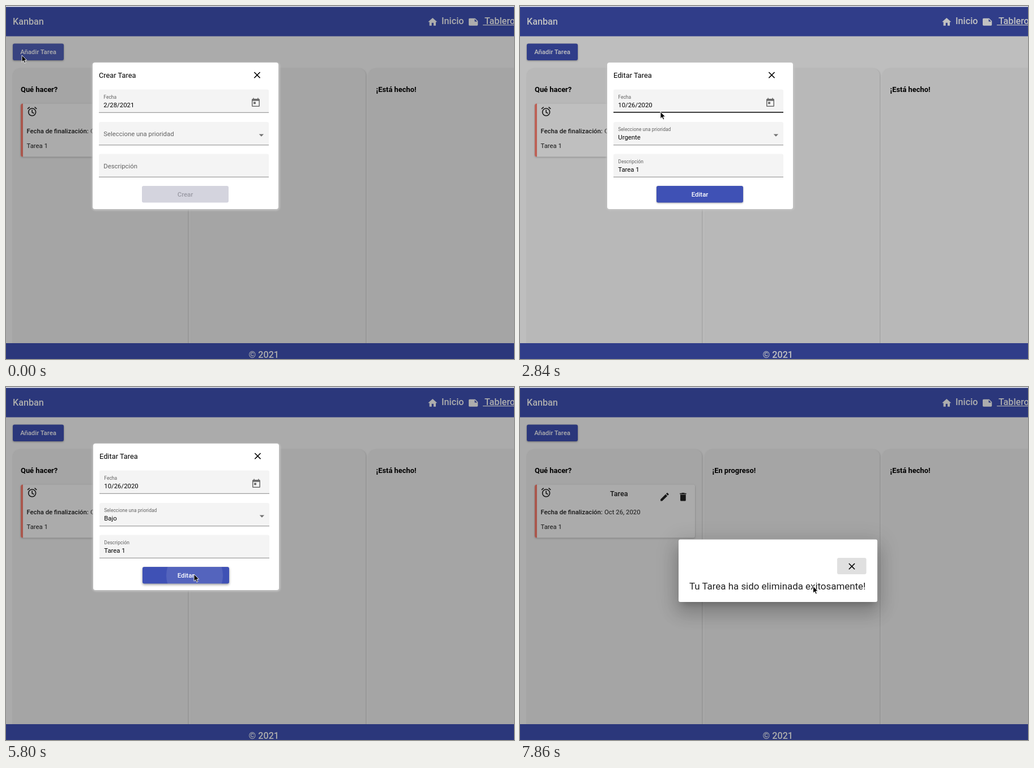
Write an HTML page that moves like this. It is 897 px wide and 624 px high and loops after 8 s.

```html
<!DOCTYPE html>
<html lang="es">
<head>
<meta charset="utf-8">
<title>Kanban</title>
<style>
  html, body { margin: 0; width: 100%; height: 100%; overflow: hidden; background: #fbfbfb; }
  svg { display: block; }
  text { font: 400 11.35px Roboto, sans-serif; fill: rgba(0,0,0,.87); white-space: pre; }
  .bar { fill: #3f51b5; }
  .head { font-size: 16.2px; font-weight: 500; fill: #fff; }
  .title { font-size: 12.9px; font-weight: 700; fill: #000; }
  .medium { font-weight: 500; }
  .white { fill: #fff; }
  .mid { text-anchor: middle; }
  .label { font-size: 8.5px; fill: rgba(0,0,0,.6); }
  .hint { fill: rgba(0,0,0,.6); }
  .value { fill: #000; }
  .raised { filter: drop-shadow(0 1px 1.5px rgba(0,0,0,.35)); }
  .column { fill: #f3f3f3; filter: drop-shadow(1px 1px 1.5px rgba(0,0,0,.2)); }
  .card { fill: #fcfcfc; filter: drop-shadow(0 1px 1.5px rgba(0,0,0,.25)); }
  .halo { fill: #c3c3c3; opacity: .75; filter: blur(1px); }
</style>
</head>
<body>
<svg id="stage" width="897" height="624" viewBox="0 0 897 624">
  <defs>
    <path id="home" d="M10 20v-6h4v6h5v-8h3L12 3 2 12h3v8z"/>
    <path id="note" d="M22 10l-6-6H4c-1.1 0-2 .9-2 2v12c0 1.1.9 2 2 2h16c1.1 0 2-.9 2-2zm-7-4.5l5.5 5.5H15z"/>
    <path id="pencil" d="M3 17.25V21h3.75L17.8 9.94l-3.75-3.75zM20.7 7.04a1 1 0 0 0 0-1.41l-2.34-2.34a1 1 0 0 0-1.41 0l-1.83 1.83 3.75 3.75z"/>
    <path id="trash" d="M6 19c0 1.1.9 2 2 2h8c1.1 0 2-.9 2-2V7H6zM19 4h-3.5l-1-1h-5l-1 1H5v2h14z"/>
    <path id="cross" d="M19 6.4L17.6 5 12 10.6 6.4 5 5 6.4 10.6 12 5 17.6 6.4 19 12 13.4 17.6 19 19 17.6 13.4 12z"/>
    <path id="calendar" fill-rule="evenodd" d="M19 3h-1V1h-2v2H8V1H6v2H5a2 2 0 0 0-2 2v14a2 2 0 0 0 2 2h14a2 2 0 0 0 2-2V5a2 2 0 0 0-2-2zm0 16H5V8h14zM7 10h5v5H7z"/>
    <g id="alarm" fill="none" stroke="#222" stroke-width="2">
      <circle cx="12" cy="13" r="8"/><path d="M12 8v5.5l4 2.3M2 6l4.6-3.9M22 6l-4.6-3.9"/>
    </g>
    <clipPath id="buttonClip"><rect x="241" y="318" width="153" height="30" rx="3"/></clipPath>
  </defs>

  <rect width="897" height="624" fill="#fbfbfb"/>
  <rect class="bar" y="1.5" width="897" height="52"/>
  <text class="head" x="12" y="33">Kanban</text>
  <g fill="#fff">
    <use href="#home" transform="translate(743.6 18.5) scale(.81)"/>
    <use href="#note" transform="translate(815.4 18.5) scale(.81)"/>
    <rect x="842" y="33" width="55" height="1.2"/>
  </g>
  <text class="head" x="769" y="32">Inicio</text>
  <text class="head" x="845" y="32">Tablero</text>

  <rect class="bar raised" x="12" y="66.5" width="90" height="29.5" rx="3"/>
  <rect id="addGlow" x="12" y="66.5" width="90" height="29.5" rx="3" fill="#fff" opacity=".1"/>
  <text class="medium white mid" x="57" y="85">Añadir Tarea</text>

  <rect class="column" x="12" y="110.5" width="309" height="530" rx="12"/>
  <rect class="column" x="326.5" y="110.5" width="308.5" height="530" rx="12"/>
  <rect class="column" x="640" y="110.5" width="309" height="530" rx="12"/>
  <text class="title" x="26" y="152">Qué hacer?</text>
  <text class="title" x="339.5" y="152">¡En progreso!</text>
  <text class="title" x="653.5" y="152">¡Está hecho!</text>

  <rect class="card" x="26" y="172.5" width="283" height="94" rx="3.5"/>
  <path d="M30 172.5v94h-.5a3.5 3.5 0 0 1-3.5-3.5v-87a3.5 3.5 0 0 1 3.5-3.5z" fill="#fa8072"/>
  <use href="#alarm" transform="translate(36.4 177) scale(.81)"/>
  <text class="medium" style="font-size:12.7px" x="159" y="192.5">Tarea</text>
  <g fill="#222">
    <use href="#pencil" transform="translate(245.7 184.6) scale(.81)"/>
    <use href="#trash" transform="translate(278.2 184.6) scale(.81)"/>
  </g>
  <text class="medium" x="36.5" y="225" style="font-size:11.25px">Fecha de finalización:</text>
  <text x="149" y="225">Oct 26, 2020</text>
  <text x="36.5" y="251">Tarea 1</text>

  <rect class="bar" y="596" width="897" height="28"/>
  <text class="head mid" x="455.3" y="622">© 2021</text>

  <rect id="backdrop" y="1.5" width="897" height="623"/>

  <g id="dialog">
    <rect class="halo" x="152" y="99" width="333" height="263" rx="7"/>
    <rect x="154" y="100" width="328" height="259" rx="4" fill="#fff"/>
    <text id="heading" class="value" style="font-size:12.8px" x="165" y="127"></text>
    <use href="#cross" transform="translate(434.7 112.4) scale(.81)"/>
    <g id="fields"></g>
    <use href="#calendar" transform="translate(432.6 161.6) scale(.78)" fill-opacity=".56"/>
    <path d="M447.7 226.5h8.4l-4.2 4.2z" fill-opacity=".54"/>
    <rect id="submit" class="bar raised" x="241" y="318" width="153" height="29.5" rx="3"/>
    <circle id="ripple" cx="333" cy="333" fill="#fff" opacity=".11" clip-path="url(#buttonClip)"/>
    <text id="submitText" class="medium mid" x="317.5" y="336.7"></text>
    <g id="panel">
      <rect class="raised white" x="160" y="199.5" width="305" height="78" rx="3"/>
      <rect x="160" y="199.5" width="305" height="39" fill-opacity=".05"/>
      <rect id="optionHover" x="160" width="305" height="39" fill-opacity=".04"/>
      <text x="173" y="223.5" style="font-size:12.9px">Urgente</text>
      <text x="173" y="262.5" style="font-size:12.9px">Bajo</text>
    </g>
  </g>

  <g id="message">
    <rect x="285.7" y="284" width="339.6" height="99" opacity=".2" style="filter:blur(6px)"/>
    <rect x="277.6" y="286" width="355.8" height="116" opacity=".14" style="filter:blur(15.4px)"/>
    <rect x="273.5" y="270" width="364" height="124" opacity=".12" style="filter:blur(18.6px)"/>
    <rect x="280" y="269.5" width="351" height="110.5" rx="3" fill="#fff"/>
    <rect x="560" y="302" width="51.5" height="29" rx="3" fill="#e0e0e0"/>
    <use href="#cross" transform="translate(576.2 307.4) scale(.81)"/>
    <text x="299" y="357.7" style="font-size:16.9px">Tu Tarea ha sido eliminada exitosamente!</text>
  </g>

  <g id="cursor">
    <path id="arrow" d="M0 0V12.2L2.8 9.6 4.8 14 6.8 13.1 4.9 8.8H8.7Z" stroke="#fff" stroke-width=".9"/>
    <path id="hand" transform="translate(-5 -1)" fill="#fff" stroke="#000"
      d="M4 1.5c0-1.2 2-1.2 2 0V6c.4-.8 2-.7 2 .3 .6-.7 2-.5 2 .5 .8-.6 2-.2 2 .8v2.6c0 2-1 2.8-1.4 4H5.2C4.4 12 2.2 9.8 1.2 8.4c-.5-1 .7-1.6 1.5-.8L4 8.8z"/>
  </g>
</svg>
<script>
const LOOP = 8000, STEP = LOOP / 54;
const el = id => document.getElementById(id);
const show = (id, on) => el(id).style.display = on ? '' : 'none';

const cursorTrack = [
  [0, 28, 87], [2, 190, 190], [4, 328, 331], [7, 442, 119], [9, 442, 119], [10, 404, 107],
  [16, 250, 189], [18, 250, 189], [19, 248, 187], [24, 396, 225], [25, 396, 225],
  [28, 384, 254], [32, 384, 254], [36, 332, 331], [39, 332, 331], [41, 321, 304],
  [45, 287, 191], [47, 287, 191], [53, 536, 365]
];
const shadeTrack = [
  [0, .32], [8, .32], [9, .27], [10, .045], [11, .006], [12, 0], [18, 0], [19, .245], [20, .305],
  [21, .32], [39, .32], [40, .06], [41, 0], [48, 0], [49, .245], [50, .305], [51, .32]
];
const dialogTrack = [[0, 1], [8, 1], [9, .85], [10, 0], [18, 0], [19, 1], [39, 1], [40, 0]];

function sample(track, tick) {
  const i = track.findIndex(key => key[0] > tick);
  if (i < 0) return track[track.length - 1].slice(1);
  const [a, b] = [track[i - 1], track[i]];
  const p = (tick - a[0]) / (b[0] - a[0]), eased = p * p * (3 - 2 * p);
  return a.slice(1).map((v, k) => v + (b[k + 1] - v) * eased);
}

const fields = [['Fecha', 147.5], ['Seleccione una prioridad', 205], ['Descripción', 261.5]].map(([label, y]) => {
  const group = document.createElementNS('http://www.w3.org/2000/svg', 'g');
  group.innerHTML = `<path d="M165 ${y + 41}v-38a3 3 0 0 1 3-3h294a3 3 0 0 1 3 3v38z" fill="#f4f4f4"/>
    <rect x="165" width="300"/><text x="173.3">${label}</text><text class="value" x="173.3" y="${y + 31}"></text>`;
  el('fields').append(group);
  const [, line, caption, value] = group.children;
  return { y, line, caption, value };
});

function drawField({ y, line, caption, value }, text, hovered) {
  value.textContent = text;
  caption.setAttribute('class', text ? 'label' : 'hint');
  caption.setAttribute('y', y + (text ? 16.3 : 25));
  line.setAttribute('y', y + (hovered ? 39.5 : 40.3));
  line.setAttribute('height', hovered ? 1.7 : 1);
  line.setAttribute('fill-opacity', hovered ? .87 : .45);
}

function draw(tick) {
  const [x, y] = sample(cursorTrack, tick);
  const creating = tick < 14;
  const panelOpen = tick >= 26 && tick <= 32;
  const opacity = sample(dialogTrack, tick)[0];

  el('backdrop').setAttribute('opacity', sample(shadeTrack, tick)[0]);
  show('addGlow', tick < 9);

  show('dialog', opacity > 0);
  el('dialog').setAttribute('opacity', opacity);
  el('dialog').setAttribute('transform', `translate(${creating ? -1 : 0} 0)`);
  el('heading').textContent = creating ? 'Crear Tarea' : 'Editar Tarea';
  const values = creating ? ['2/28/2021', '', ''] : ['10/26/2020', tick < 33 ? 'Urgente' : 'Bajo', 'Tarea 1'];
  fields.forEach((field, i) => drawField(field, values[i],
    !panelOpen && x > 165 && x < 465 && y > field.y && y < field.y + 41));

  el('submit').style.fill = creating ? '#d4d4de' : '';
  el('submit').style.filter = creating ? 'none' : tick >= 35 ? 'drop-shadow(0 2px 2px rgba(0,0,0,.4))' : '';
  el('submitText').textContent = creating ? 'Crear' : 'Editar';
  el('submitText').style.fill = creating ? '#9a9aa4' : '#fff';
  el('ripple').setAttribute('r', tick === 38 ? 24 : tick === 39 ? 50 : 0);

  show('panel', panelOpen);
  el('optionHover').setAttribute('y', y < 238.5 ? 199.5 : 238.5);
  show('message', tick >= 49);

  const pointing = tick >= 23 && tick <= 33;
  show('hand', pointing);
  show('arrow', !pointing);
  el('cursor').setAttribute('transform', `translate(${x} ${y})`);
}

function loop() {
  const time = performance.now() % LOOP;
  draw(Math.max(0, Math.floor((time - 12) / STEP)));
  requestAnimationFrame(loop);
}
loop();
</script>
</body>
</html>
```
